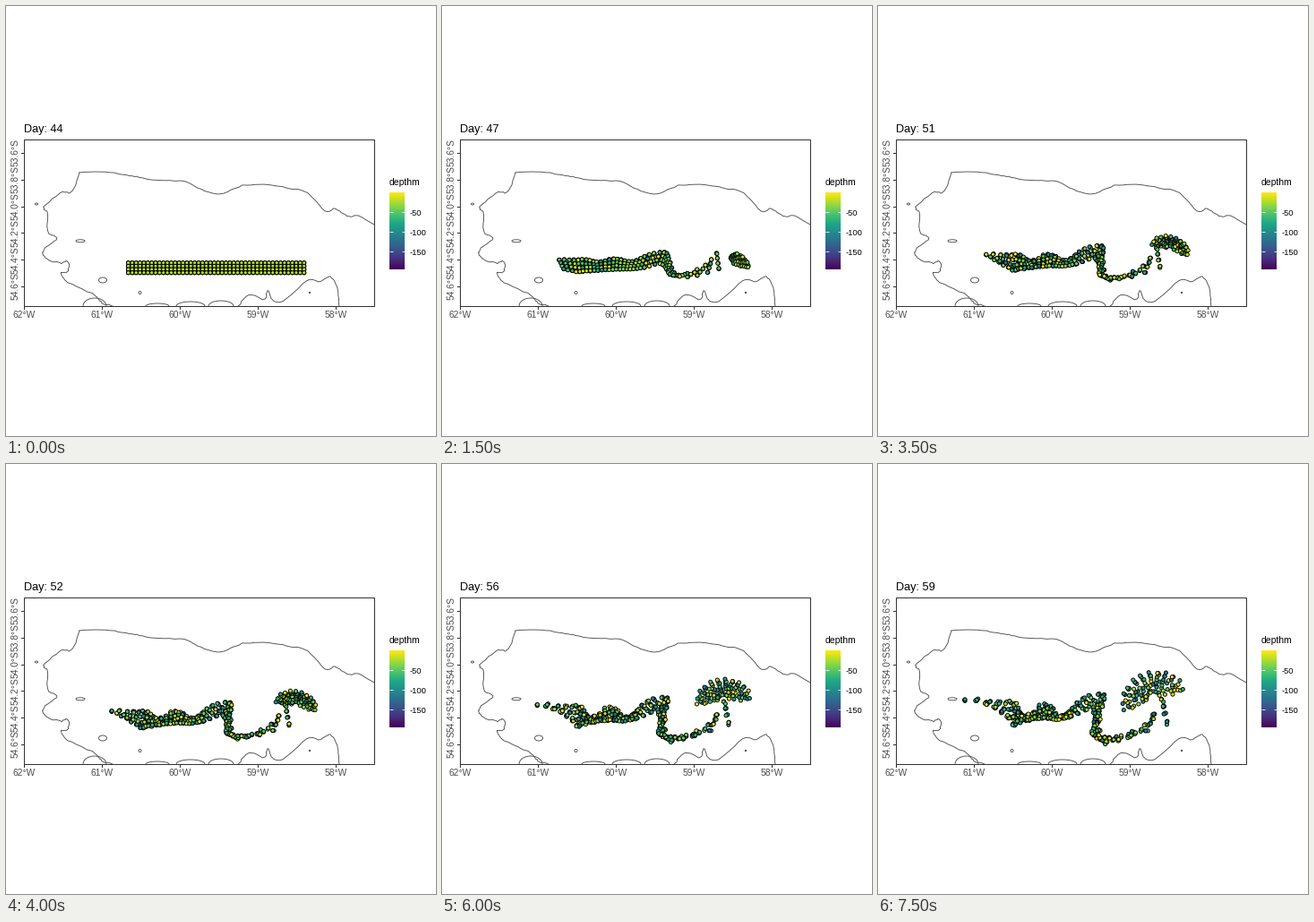
Animation, 480 px wide and 480 px high, one loop 8 s. Source, as a matplotlib script:

```python
import numpy as np
import matplotlib.pyplot as plt
from matplotlib.animation import FuncAnimation
from matplotlib.patches import Ellipse, Rectangle

plt.rcParams["font.family"] = "Liberation Sans"

DAYS, FIRST_DAY = 16, 44
COLS, ROWS, COPIES = 46, 4, 3
EDDY_COL = 38
GREY, DARK = "#4d4d4d", "#333333"

NORTH = [(411, 244), (393, 234), (382, 235), (368, 226), (356, 229), (336, 208),
         (318, 204), (283, 199), (260, 202), (239, 210), (220, 206), (200, 196),
         (172, 195), (148, 191), (136, 189), (112, 185), (82, 186)]
WEST = [(82, 186), (74, 207), (62, 208), (43, 224), (46, 231), (47, 252), (57, 260),
        (42, 272), (44, 281), (60, 287), (69, 285), (69, 297), (61, 298), (70, 309),
        (98, 322), (107, 331), (119, 335)]
SOUTH = [(259, 335), (272, 322), (288, 328), (292, 318), (298, 329), (312, 328),
         (337, 306), (350, 308), (362, 302), (370, 315), (372, 335)]
ARCHES = [(86, 112, 9), (156, 182, 3), (190, 222, 5), (226, 254, 6)]
ISLANDS = [(34, 221, 3, 2), (83, 262.3, 10, 3), (108, 306, 9, 6),
           (149.5, 320, 3, 3), (339, 320, 1.5, 1.5)]

# Where the ribbon ends up: column, north edge x y, south edge x y
RIBBON = np.array([
    (0, 97, 263, 133, 268), (3, 136, 266, 150, 290), (6, 152, 268, 157, 288),
    (9, 162, 282, 168, 285), (13, 186, 269, 183, 283), (18, 207, 282, 199, 284),
    (22, 229, 262, 215, 282), (25, 252, 259, 240, 273), (28, 247, 277, 242, 289),
    (32, 255, 311, 244, 303), (35, 300, 292, 280, 304), (37, 317, 264, 322, 287)], float)


def spline(x, xs, ys):
    """Cubic Hermite curve through the points ys at knots xs."""
    xs, ys = np.asarray(xs, float), np.asarray(ys, float)
    slope = np.gradient(ys, xs, axis=0)
    i = np.clip(np.searchsorted(xs, x, side="right") - 1, 0, len(xs) - 2)
    h = (xs[i + 1] - xs[i])[:, None]
    s = (x - xs[i])[:, None] / h
    return ((2 * s**3 - 3 * s**2 + 1) * ys[i] + (s**3 - 2 * s**2 + s) * h * slope[i]
            + (3 * s**2 - 2 * s**3) * ys[i + 1] + (s**3 - s**2) * h * slope[i + 1])


def coast(points, rng):
    """Smooth line through key points with a little roughness."""
    u = np.linspace(0, len(points) - 1, 5 * len(points))
    line = spline(u, np.arange(len(points)), points)
    line[1:-1] += rng.normal(0, 0.4, line[1:-1].shape)
    return line


rng = np.random.default_rng(11)
copy, col, row = (a.ravel() for a in np.indices((COPIES, COLS, ROWS)))
grid = np.stack([136.5 + 4.36 * col, 286.7 + 3.67 * row], axis=1)
drift = rng.normal(0, 0.07, grid.shape)

edges = spline(np.minimum(col, EDDY_COL - 1), RIBBON[:, 0], RIBBON[:, 1:])
v = (row / (ROWS - 1))[:, None]
ribbon_end = edges[:, :2] * (1 - v) + edges[:, 2:] * v
pace = 0.35 + 0.027 * np.abs(col - 32)  # the narrow strand forms first

in_eddy = col >= EDDY_COL
radius = np.sqrt(np.clip((col - EDDY_COL + 0.3) / (COLS - EDDY_COL - 0.7), 0, 1))
turn = np.pi * (1.08 - 1.16 * (row + (copy + 0.5) / COPIES) / ROWS)


def eddy(day):
    """Fan of particles round a centre that drifts, grows and tilts."""
    left = (DAYS - 1 - day) / 10
    x = (8 + 1.7 * day) * radius * np.cos(turn)
    y = -1.85 * day * radius * np.sin(turn)
    tilt = 0.85 - 0.08 * day
    return np.stack([307 + 24 * left + x * np.cos(tilt) - y * np.sin(tilt),
                     260 + 15 * left**1.6 + x * np.sin(tilt) + y * np.cos(tilt)], axis=1)


def positions(day):
    done = (day / (DAYS - 1)) ** pace[:, None]
    pos = grid + (ribbon_end - grid) * done
    s = min(day / 5, 1)
    mix = s * s * (3 - 2 * s)
    pos[in_eddy] = (grid + (eddy(day) - grid) * mix)[in_eddy]
    return pos + drift * day


def depths(day):
    """Release level at first, then spread through the mixed layer."""
    mixing = np.clip(day / (2.5 + 4 * col / COLS), 0, 1)
    spread = np.random.default_rng(100 + day).beta(1.0, 1.6, len(col))
    return -22 * (1 - mixing) - 135 * spread * mixing


fig = plt.figure(figsize=(480 / 72, 480 / 72), dpi=72, facecolor="white")
ax = fig.add_axes([0, 0, 1, 1])
ax.axis("off")

for points in (NORTH, WEST, SOUTH):
    ax.plot(*coast(points, rng).T, color=GREY, lw=0.9)
arc = np.linspace(np.pi, 0, 15)
for x0, x1, h in ARCHES:
    ax.plot((x0 + x1) / 2 + (x1 - x0) / 2 * np.cos(arc), 335 - h * np.sin(arc),
            color=GREY, lw=0.9)
for x, y, w, h in ISLANDS:
    ax.add_patch(Ellipse((x, y), w, h, fill=False, ec=GREY, lw=0.9))

dots = ax.scatter(*grid.T, c=depths(0), s=17, cmap="viridis", vmin=-195, vmax=0,
                  edgecolors="black", linewidths=0.9, zorder=3)

ax.add_patch(Rectangle((20, 149), 391, 186, fill=False, ec=DARK, lw=1, zorder=4))
for i in range(5):
    x = 20 + 87 * i
    ax.plot([x, x], [335, 338], color=DARK, lw=1)
    ax.text(x, 348, f"{62 - i}°W", size=10.2, color=GREY, ha="center")
for i in range(6):
    y = 164 + 29.8 * i
    ax.plot([17, 20], [y, y], color=DARK, lw=1)
    ax.text(15.5, y, f"{53.6 + 0.2 * i:.1f}°S", size=10.2, color=GREY, rotation=90,
            ha="right", va="center")

ax.imshow(np.linspace(1, 0, 256)[:, None], cmap="viridis", aspect="auto",
          extent=(428, 445, 294, 208), zorder=2)
ax.text(428, 200.5, "depthm", size=10.4)
for d in (50, 100, 150):
    y = 208 + 0.443 * d
    for x in (428, 441.5):
        ax.plot([x, x + 3.5], [y, y], color="white", lw=0.8, zorder=3,
                solid_capstyle="butt")
    ax.text(450.5, y + 3.7, f"-{d}", size=9.2)
ax.set(xlim=(0, 480), ylim=(480, 0))

title = ax.text(20, 141.5, "", size=12.8)


def draw(day):
    title.set_text(f"Day: {FIRST_DAY + day}")
    dots.set_offsets(positions(day))
    dots.set_array(depths(day))
    return dots, title


anim = FuncAnimation(fig, draw, frames=DAYS, interval=500, repeat=True)
plt.show()
```
